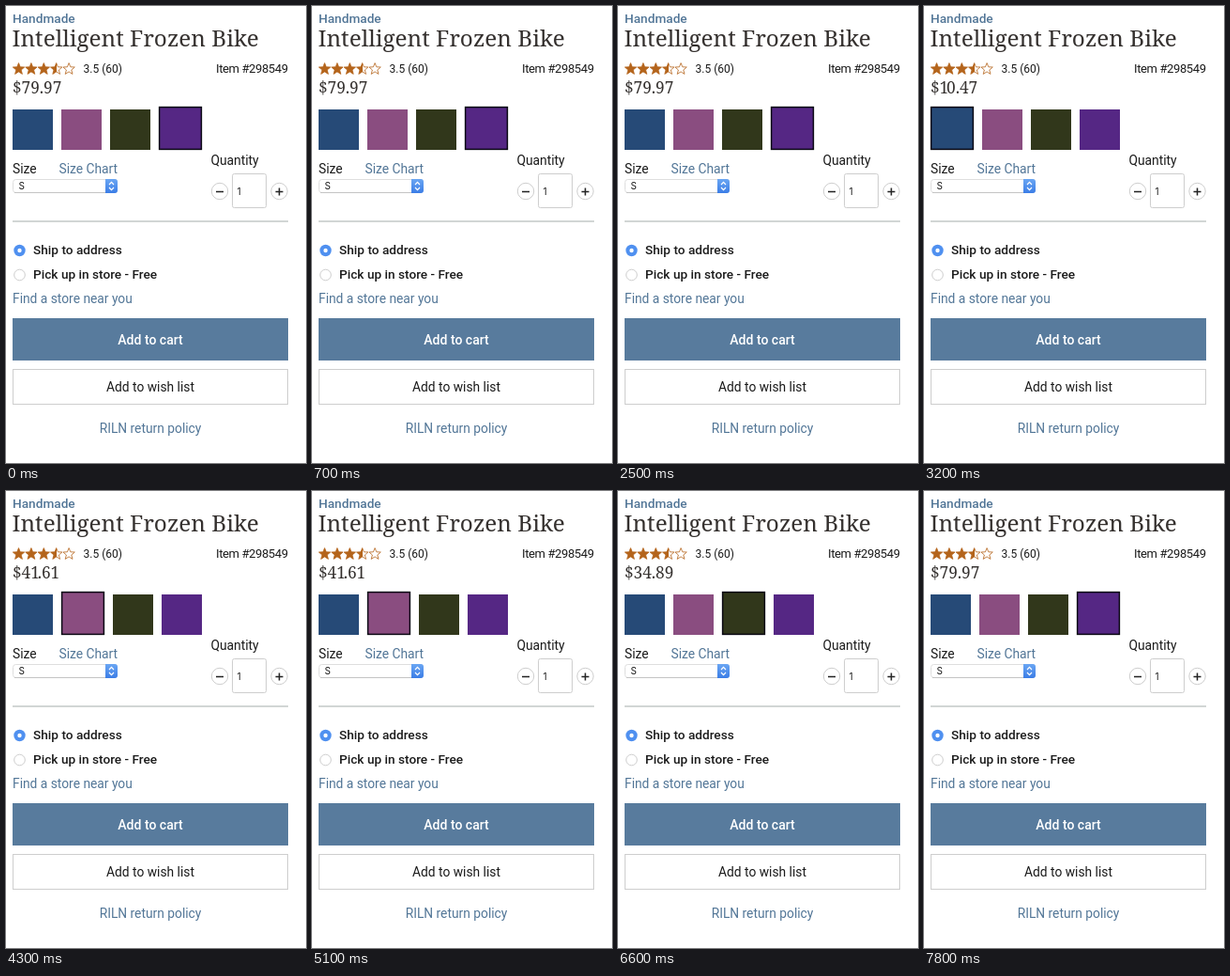
Write an HTML page that moves like this. It is 320x486 px and loops after 8 s.

```html
<!DOCTYPE html>
<html lang="en">
<head>
<meta charset="utf-8">
<title>Product options</title>
<style>
  html, body { margin: 0; width: 100%; height: 100%; overflow: hidden; background: #fff; }
  svg { display: block; width: 320px; height: 486px; }
  text { font: 13.8px Roboto, sans-serif; fill: #1b1b1b; white-space: pre; }
  .link { fill: #527697; }
  .serif { font-family: "Noto Serif", serif; font-weight: 500; fill: #35312f; }
  .title { font-size: 24.3px; }
  .price { font-size: 17.2px; }
  .rating { font-size: 12px; }
  .item { font-size: 13px; letter-spacing: -.38px; text-anchor: end; }
  .medium { font-size: 13.65px; font-weight: 500; }
  .field { font: 10px Inter, sans-serif; }
  .mid { text-anchor: middle; }
  .box { fill: #fff; stroke: #cecece; }
  .sign { stroke: #222; stroke-width: 1.5; }
</style>
</head>
<body>
<svg viewBox="0 0 320 486">
  <defs>
    <path id="star" d="M0-6.4 1.7-2.2 6.2-2 2.7 1 3.9 5.4 0 2.9-3.9 5.4-2.7 1-6.2-2-1.7-2.2Z"/>
    <linearGradient id="half">
      <stop offset=".5" stop-color="#b4641b"/>
      <stop offset=".5" stop-color="#fff"/>
    </linearGradient>
    <linearGradient id="knob" x2="0" y2="1">
      <stop stop-color="#6aa6f3"/>
      <stop offset="1" stop-color="#3b7de6"/>
    </linearGradient>
  </defs>

  <text class="link medium" x="7" y="18.4">Handmade</text>
  <text class="serif title" x="6.5" y="43">Intelligent Frozen Bike</text>
  <g id="stars" stroke="#b4641b" stroke-width=".8"></g>
  <text class="rating" x="82.5" y="71">3.5 (60)</text>
  <text class="item" x="300.6" y="71">Item #298549</text>
  <text class="serif price" id="price" x="7" y="93"></text>
  <g id="swatches"></g>

  <text x="7" y="178">Size</text>
  <text class="link" x="56.5" y="178">Size Chart</text>
  <rect x="7.5" y="184.5" width="111" height="14" rx="3" fill="#fff" stroke="#dedede"/>
  <path d="M9 198.5H107" stroke="#c4c4c4"/>
  <path d="M106 184H116a3 3 0 0 1 3 3V196a3 3 0 0 1-3 3H106Z" fill="url(#knob)"/>
  <path d="M110 190l2.5-2.6 2.5 2.6M110 193l2.5 2.6 2.5-2.6" fill="none" stroke="#fff" stroke-width="1.2"/>
  <text class="field" x="13.5" y="195">S</text>

  <text x="218.5" y="169">Quantity</text>
  <circle class="box" cx="228" cy="197" r="8.7"/>
  <path class="sign" d="M224 197.5h8"/>
  <rect class="box" x="241.5" y="178.5" width="36" height="36" rx="2"/>
  <text class="field" x="246.5" y="201">1</text>
  <circle class="box" cx="291.5" cy="197" r="8.7"/>
  <path class="sign" d="M287.5 197.5h8m-4-4v8"/>

  <path d="M7 229H301" stroke="#a5adac" stroke-width="1.2"/>
  <circle cx="14.5" cy="260" r="6.2" fill="#4f90f0"/>
  <circle cx="14.5" cy="260" r="2.2" fill="#fff"/>
  <circle class="box" cx="14.5" cy="286" r="5.8"/>
  <text class="medium" x="29" y="264">Ship to address</text>
  <text class="medium" x="29" y="290">Pick up in store - Free</text>
  <text class="link" x="7" y="316">Find a store near you</text>

  <rect x="7" y="332" width="294" height="45" fill="#587b9d"/>
  <text class="medium mid" x="154" y="360" style="fill:#fff; font-size:14px">Add to cart</text>
  <rect class="box" x="7.5" y="386.5" width="293" height="37"/>
  <text class="mid" x="154" y="410">Add to wish list</text>
  <text class="link mid" x="154" y="454">RILN return policy</text>
</svg>
<script>
  const LOOP = 8000;
  const variants = [
    { color: '#264a77', price: '$10.47' },
    { color: '#8a4d80', price: '$41.61' },
    { color: '#31371b', price: '$34.89' },
    { color: '#552784', price: '$79.97' },
  ];
  const picks = [[0, 3], [2600, 0], [3900, 1], [5200, 2], [6700, 3]];
  const byId = id => document.getElementById(id);

  byId('stars').innerHTML = [0, 1, 2, 3, 4].map(i => {
    const fill = i < 3 ? '#b4641b' : i === 3 ? 'url(#half)' : '#fff';
    return `<use href="#star" x="${13.5 + i * 13.4}" y="67" fill="${fill}"/>`;
  }).join('');

  // The picked swatch is 3px larger and pushes the later ones aside.
  function swatch(i, picked) {
    const x = 7 + i * 52 + (i > picked ? 3 : 0);
    const { color } = variants[i];
    return i === picked
      ? `<rect x="${x + .6}" y="107.6" width="44.8" height="44.8" fill="${color}" stroke="#0c0a14" stroke-width="1.5"/>`
      : `<rect x="${x}" y="110" width="43" height="43" fill="${color}"/>`;
  }

  let shown = -1;
  function select(picked) {
    if (picked === shown) return;
    shown = picked;
    byId('swatches').innerHTML = variants.map((_, i) => swatch(i, picked)).join('');
    byId('price').innerHTML = variants[picked].price
      .replace(/1/g, '<tspan letter-spacing="-2.2">1</tspan>');
  }

  function frame() {
    const time = performance.now() % LOOP;
    select(picks.findLast(([start]) => time >= start)[1]);
    requestAnimationFrame(frame);
  }
  frame();
</script>
</body>
</html>
```
